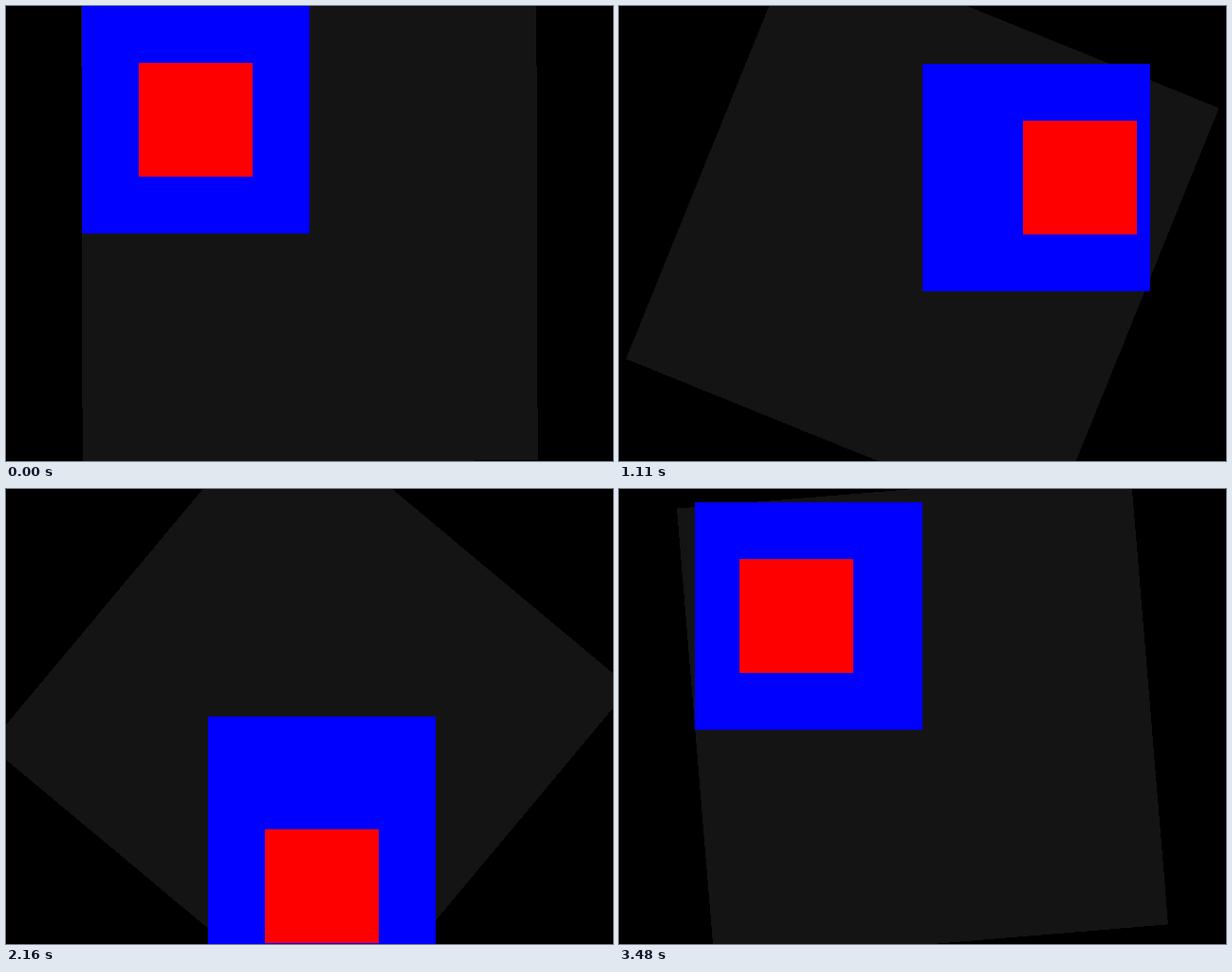
These frames come from a looping animation (640x480 px, 3.51 s). An HTML page:

```html
<!DOCTYPE html>
<html>
<head>
<meta charset="utf-8">
<title>Square orbit</title>
<style>
html, body { margin: 0; width: 100%; height: 100%; overflow: hidden; background: #000; }
svg { display: block; width: 640px; height: 480px; }
</style>
</head>
<body>
<svg viewBox="0 0 640 480" shape-rendering="crispEdges">
  <rect width="640" height="480" fill="#000"/>
  <rect id="back" x="80" width="480" height="480" fill="#141414"/>
  <rect id="blue" width="240" height="240" fill="#00f"/>
  <rect id="red" width="120" height="120" fill="#f00"/>
</svg>
<script>
const STEP = 30, COUNT = 117;
const CX = 320, CY = 240, R = 120;
const [back, blue, red] = ["back", "blue", "red"].map(id => document.getElementById(id));

// Rotates (x, y) by whole quarter turns, clockwise on screen.
function quarter(x, y, n) {
  for (; n > 0; n--) [x, y] = [-y, x];
  return [x, y];
}

function place(el, [x, y], half) {
  el.setAttribute("x", (CX + x - half).toFixed(3));
  el.setAttribute("y", (CY + y - half).toFixed(3));
}

function draw(ms) {
  const n = Math.floor(ms / STEP) % COUNT;
  const p = (n * 0.034 - 0.002 + 4) % 4;   // position in sides of the path
  const side = Math.floor(p), f = p - side;
  const along = 2 * f - 1;
  const bump = 4 * f * (1 - f);            // parabola, 0 at corners, 1 mid-side

  place(blue, quarter(along * R, -R, side), 120);
  place(red, quarter(along * R, -R - bump * 60, side), 60);

  const angle = side * 90 + 45 + Math.atan2(along, 1 + 0.2 * bump) * 180 / Math.PI;
  back.setAttribute("transform", `rotate(${angle.toFixed(4)} ${CX} ${CY})`);
}

let start = null;
function tick(now) {
  if (start === null) start = now;
  draw(Math.max(0, now - start));
  requestAnimationFrame(tick);
}
draw(0);
requestAnimationFrame(tick);
</script>
</body>
</html>
```
